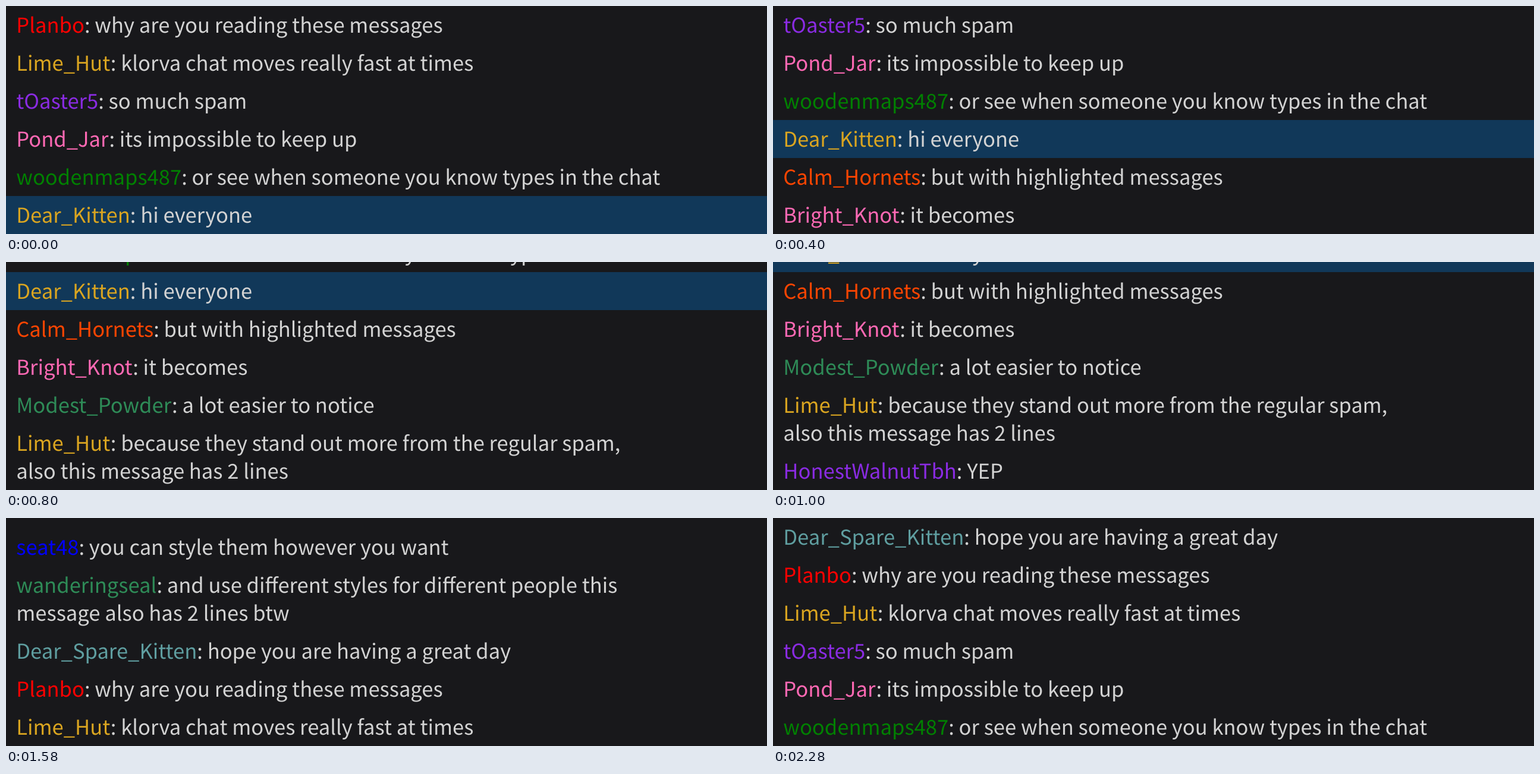
Animation, 1280 px wide and 384 px high, one loop 2.58 s. Source, as an HTML page:

```html
<!DOCTYPE html>
<html lang="en">
<head>
<meta charset="utf-8">
<title>Chat scroll</title>
<style>
  html, body { margin: 0; width: 100%; height: 100%; overflow: hidden; background: #18181b; }
  svg { display: block; width: 1280px; height: 384px; }
  text {
    font: 34.6px "Noto Sans CJK JP", "Noto Sans CJK SC", "Noto Sans CJK", "Noto Sans", sans-serif;
    fill: #d3d3d3;
    text-rendering: geometricPrecision;
  }
</style>
</head>
<body>
<svg viewBox="0 0 1280 384"><g id="chat"></g></svg>
<script>
const STAGE_HEIGHT = 384, ROW = 64, LINE = 47, BASELINE = 45, LEFT = 17.3, LOOP = 2580;

const messages = [
  { name: 'Planbo', color: 'red', lines: ['why are you reading these messages'] },
  { name: 'Lime_Hut', color: 'goldenrod', lines: ['klorva chat moves really fast at times'] },
  { name: 'tOaster5', color: 'blueviolet', lines: ['so much spam'] },
  { name: 'Pond_Jar', color: 'hotpink', lines: ['its impossible to keep up'] },
  { name: 'woodenmaps487', color: 'green', lines: ['or see when someone you know types in the chat'] },
  { name: 'Dear_Kitten', color: 'goldenrod', lines: ['hi everyone'], highlight: '#113859' },
  { name: 'Calm_Hornets', color: 'orangered', lines: ['but with highlighted messages'] },
  { name: 'Bright_Knot', color: 'hotpink', lines: ['it becomes'] },
  { name: 'Modest_Powder', color: 'seagreen', lines: ['a lot easier to notice'] },
  { name: 'Lime_Hut', color: 'goldenrod',
    lines: ['because they stand out more from the regular spam,', 'also this message has 2 lines'] },
  { name: 'HonestWalnutTbh', color: 'blueviolet', lines: ['YEP'] },
  { name: 'seat48', color: 'blue', lines: ['you can style them however you want'] },
  { name: 'wanderingseal', color: 'seagreen',
    lines: ['and use different styles for different people this', 'message also has 2 lines btw'] },
  { name: 'Dear_Spare_Kitten', color: 'cadetblue', lines: ['hope you are having a great day'] },
];

// [time in ms, index of the newest message]; indices wrap around the list
const arrivals = [
  [0, 5], [200, 6], [400, 7], [600, 8], [800, 9], [1000, 10], [1100, 11],
  [1300, 12], [1500, 13], [1580, 15], [1980, 16], [2180, 17], [2280, 18],
];

const chat = document.getElementById('chat');
const rowEnds = [];

function buildChat() {
  const lastIndex = arrivals[arrivals.length - 1][1];
  let top = 0, markup = '';
  for (let i = 0; i <= lastIndex; i++) {
    const { name, color, lines, highlight } = messages[i % messages.length];
    const height = ROW + (lines.length - 1) * LINE;
    if (highlight) markup += `<rect y="${top}" width="1280" height="${height}" fill="${highlight}"/>`;
    lines.forEach((line, n) => {
      const prefix = n ? '' : `<tspan fill="${color}">${name}</tspan>: `;
      markup += `<text x="${LEFT}" y="${top + BASELINE + n * LINE}">${prefix}${line}</text>`;
    });
    top += height;
    rowEnds.push(top);
  }
  chat.innerHTML = markup;
}

function draw() {
  const time = performance.now() % LOOP;
  const [, newest] = arrivals.findLast(([start]) => start <= time);
  chat.setAttribute('transform', `translate(0 ${STAGE_HEIGHT - rowEnds[newest]})`);
  requestAnimationFrame(draw);
}

buildChat();
draw();
</script>
</body>
</html>
```
